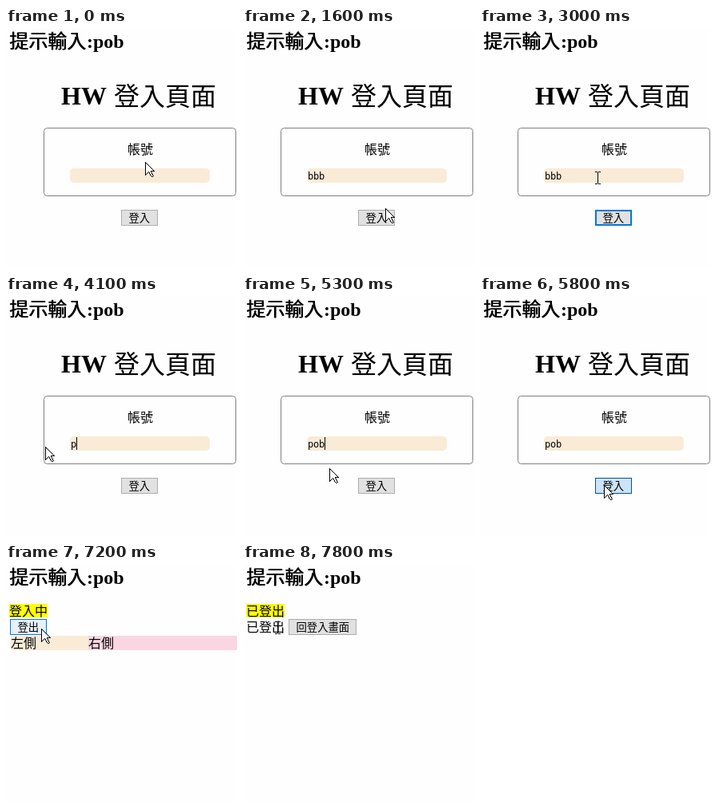
An HTML page with a canvas for the animation above (8000 ms loop, 289 by 301 pixels).

```html
<!DOCTYPE html>
<html lang="zh-Hant">
<head>
<meta charset="utf-8">
<title>登入頁面</title>
<style>
  html, body { margin: 0; width: 100%; height: 100%; overflow: hidden; background: #fefefe; }
  canvas { display: block; }
</style>
</head>
<body>
<canvas id="stage" width="289" height="301"></canvas>
<script>
const ctx = document.getElementById('stage').getContext('2d');
const LOOP = 8000, STEP = 100, BLINK = 500;
const NAME = 'pob';
const CJK = '"Noto Sans CJK TC", "Noto Sans CJK", sans-serif';
const SERIF = '"Liberation Serif", serif';
const MONO = '"DejaVu Sans Mono", monospace';
const BUTTON_H = 20;

const field = { x: 80, y: 176, w: 175, h: 18 };
const login = { label: '登入', x: 144, y: 228, w: 46 };
const logout = { label: '登出', x: 5, y: 69, w: 46 };
const back = { label: '回登入畫面', x: 57, y: 69, w: 85 };
const looks = {
  normal: ['#e1e1e1', '#adadad', 1],
  hover: ['#e5f1fb', '#0078d7', 1],
  press: ['#cce4f7', '#005499', 1],
  focus: ['#e1e1e1', '#0078d7', 2]
};

// Pointer legs, each easing out to its goal between its first and last step.
const home = { x: 174, y: 168 };
const legs = [
  { from: 100, to: 200, x: 166, y: 194 },
  { from: 1400, to: 1600, x: 178, y: 226 },
  { from: 1700, to: 1900, x: 170, y: 236 },
  { from: 2700, to: 3000, x: 147, y: 188 },
  { from: 3100, to: 3300, x: 55, y: 189 },
  { from: 3500, to: 3500, x: 49, y: 189 },
  { from: 5300, to: 5500, x: 155, y: 237 },
  { from: 6400, to: 6400, x: 157, y: 237 },
  { from: 6500, to: 7200, x: 44, y: 81 },
  { from: 7300, to: 7400, x: 40, y: 84 },
  { from: 7800, to: 7800, x: 43, y: 80 }
];

const within = (t, a, b) => t >= a && t < b;
const inside = (p, b) =>
  p.x >= b.x && p.x <= b.x + b.w && p.y >= b.y && p.y <= b.y + (b.h || BUTTON_H);
const easeOut = p => 1 - (1 - p) ** 2;

function pointerAt(t) {
  const now = Math.floor(t / STEP) * STEP;
  let { x, y } = home;
  for (const leg of legs) {
    if (now < leg.from) break;
    const p = Math.min(1, (now - leg.from + STEP) / (leg.to - leg.from + STEP));
    x += (leg.x - x) * easeOut(p);
    y += (leg.y - y) * easeOut(p);
  }
  return { x: Math.round(x), y: Math.round(y) };
}

function typedAt(t) {
  const [word, keys] = t < 4100 ? ['bbb', [1100, 1400, 1500]] : [NAME, [4100, 4600, 4800]];
  return word.slice(0, keys.filter(k => k <= t).length);
}

function caretAt(t) {
  const focused = within(t, 500, 1600) ? 500 : within(t, 4100, 5800) ? 4100 : null;
  return focused !== null && Math.floor((t - focused) / BLINK) % 2 === 0;
}

function buttonState(t, p, box) {
  if (within(t, 1900, 2100) || within(t, 5800, 5900) || within(t, 7600, 7700)) return 'press';
  if (inside(p, box)) return 'hover';
  return within(t, 2100, 3100) ? 'focus' : 'normal';
}

function rect(x, y, w, h, color) {
  ctx.fillStyle = color;
  ctx.fillRect(x, y, w, h);
}

function text(str, x, y, size, family = CJK, weight = 400, color = '#000') {
  ctx.font = `${weight} ${size}px ${family}`;
  ctx.fillStyle = color;
  ctx.fillText(str, x, y);
}

function rounded(x, y, w, h, r) {
  ctx.beginPath();
  ctx.roundRect(x, y, w, h, r);
}

function button({ label, x, y, w }, state) {
  const [fill, edge, line] = looks[state];
  rect(x, y, w, BUTTON_H, edge);
  rect(x + line, y + line, w - 2 * line, BUTTON_H - 2 * line, fill);
  text(label, x + 9.5, y + 15, 13.33);
}

function drawField(t) {
  const { x, y, w, h } = field;
  const value = typedAt(t);
  const selected = within(t, 3200, 4100);
  rounded(x, y, w, h, 5);
  ctx.fillStyle = '#faebd7';
  ctx.fill();
  if (selected) rect(x + 1, y + 1, 21, 16, '#0078d7');
  [...value].forEach((ch, i) =>
    text(ch, x + 1 + 7 * i, y + 14, 12, MONO, 400, selected ? '#fff' : '#000'));
  if (caretAt(t)) rect(x + 1 + 7 * value.length, y + 1, 1, 16, '#000');
}

function loginPage(t, p) {
  text('HW', 69, 96, 32, SERIF, 700);
  text('登入頁面', 135, 97, 32);
  rounded(47.5, 125.5, 240, 85, 4);
  ctx.strokeStyle = '#808080';
  ctx.lineWidth = 1;
  ctx.stroke();
  text('帳號', 152, 158, 16);
  drawField(t);
  button(login, buttonState(t, p, login));
}

function banner(label) {
  rect(4, 50, 48, 17, '#ff0');
  text(label, 4, 65, 16);
}

function memberPage(t, p) {
  banner('登入中');
  button(logout, buttonState(t, p, logout));
  rect(6, 90, 97, 18, '#faebd7');
  rect(103, 90, 186, 18, '#fad6e2');
  text('左側', 6, 105, 16);
  text('右側', 103, 105, 16);
}

function leftPage() {
  banner('已登出');
  text('已登出', 4, 85, 16);
  button(back, 'normal');
}

// One pixel row: black ends with white between.
function outlined(x, y, w) {
  rect(x, y, w, 1, '#000');
  if (w > 2) rect(x + 1, y, w - 2, 1, '#fff');
}

function arrow(x, y) {
  for (let i = 0; i < 11; i++) outlined(x, y + i, i + 1);
  rect(x, y + 11, 12, 1, '#000');
  rect(x + 1, y + 11, 6, 1, '#fff');
  for (let k = 0; k < 6; k++) {
    const row = y + 12 + k;
    outlined(x + 4 + Math.ceil(k / 2), row, 4);
    if (k < 5) outlined(x, row, Math.max(1, 5 - k));
  }
  rect(x + 8, y + 18, 2, 1, '#000');
}

function beam(x, y) {
  rect(x, y - 7, 1, 14, '#000');
  for (const end of [y - 8, y + 7]) {
    rect(x - 3, end, 3, 1, '#000');
    rect(x + 1, end, 3, 1, '#000');
  }
}

function render(t) {
  const p = pointerAt(t);
  const page = t < 5900 ? loginPage : t < 7700 ? memberPage : leftPage;
  rect(0, 0, 289, 301, '#fefefe');
  // Two offset passes give the heading its light synthetic bold.
  for (const dx of [0, 0.7]) text('提示輸入', 4 + dx, 25, 24);
  text(':' + NAME, 101, 25, 24, SERIF, 700);
  page(t, p);
  const dragging = within(t, 3000, 3500);
  const overText = page === leftPage || page === loginPage && inside(p, field);
  (dragging || overText ? beam : arrow)(p.x, p.y);
}

const start = performance.now();
function tick() {
  render((performance.now() - start) % LOOP);
  requestAnimationFrame(tick);
}
tick();
</script>
</body>
</html>
```
